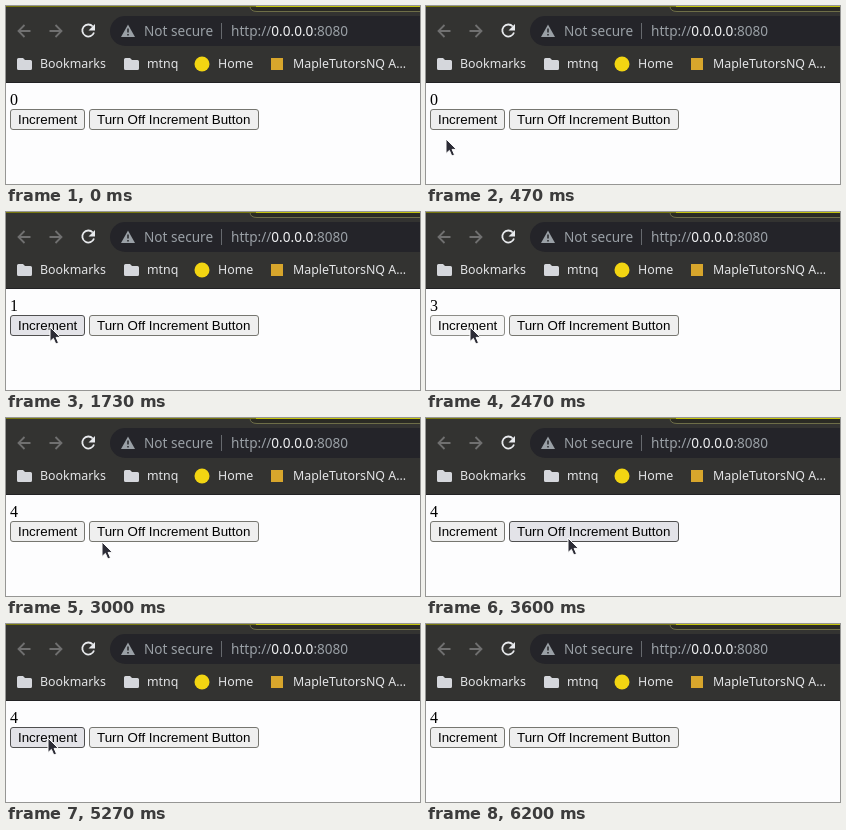
These frames come from a looping animation (414x178 px, 7470 ms). An HTML page:

```html
<!DOCTYPE html>
<html lang="en">
<head>
<meta charset="utf-8">
<title>Increment button</title>
<style>
  html, body { margin: 0; width: 100%; height: 100%; overflow: hidden; background: #fdfdfe; }
  svg { display: block; width: 414px; height: 178px; }
  text { white-space: pre; }
  .bookmarks { font: 12.4px "Noto Sans", sans-serif; fill: #e3e4e6; }
  .address { font: 13.6px "Noto Sans", sans-serif; fill: #9aa0a6; }
  .address .host { fill: #f1f2f4; }
  .icon { fill: none; stroke: #707070; stroke-width: 1.8; }
  .page { font: 16px "Liberation Serif", serif; fill: #000; }
  .button rect { fill: #efefef; stroke: #767670; }
  .button.hover rect { fill: #e3e3e8; stroke: #4f4f4f; }
  .button.pressed rect { fill: #f5f5f5; stroke: #8d8d88; }
  .button text { font: 13.333px "Liberation Sans", sans-serif; }
</style>
</head>
<body>
<svg viewBox="0 0 414 178">
  <defs>
    <path id="folder" d="M1.5 0H6l2 2h5.5Q15 2 15 3.500V10.500Q15 12 13.500 12H1.500Q0 12 0 10.500V1.500Q0 0 1.500 0Z" fill="#d5d7dc"/>
    <path id="arrow" d="M13 6.500H1.500M7 .5L1 6.500L7 12.500"/>
  </defs>

  <!-- Browser frame -->
  <rect width="414" height="77" fill="#333331"/>
  <path d="M244 0Q244 5.500 251 5.500H414V0Z" fill="#2b2b24"/>
  <path d="M244 0Q244 5.500 251 5.500H414" fill="none" stroke="#6e6e48"/>
  <rect width="250" height="1" fill="#77770f"/>
  <rect x="250" width="164" height="1" fill="#c4c40c"/>
  <rect y="76" width="414" height="1" fill="#222224"/>
  <rect x="104" y="10" width="340" height="30" rx="15" fill="#242429"/>

  <g class="icon">
    <use href="#arrow" x="11.500" y="18.500"/>
    <use href="#arrow" transform="translate(56.500 18.500) scale(-1 1)"/>
    <path d="M86.800 20.500A6 6 0 1 0 88 26.500" stroke="#e8eaed"/>
  </g>
  <path d="M89 18V24.500H82.500Z" fill="#e8eaed"/>
  <path d="M122 18.500L129 31H115Z" fill="#9aa0a6"/>
  <path d="M122 22.500V26.500M122 28V29.500" stroke="#242429" stroke-width="1.500"/>

  <g class="address">
    <text x="138" y="30">Not secure</text>
    <rect x="215" y="17" width="1" height="16" fill="#66696e"/>
    <text x="225" y="30">http://<tspan class="host">0.0.0.0</tspan>:8080</text>
  </g>

  <g class="bookmarks">
    <use href="#folder" x="11" y="52"/>
    <text x="34" y="62">Bookmarks</text>
    <use href="#folder" x="118" y="52"/>
    <text x="141" y="62">mtnq</text>
    <circle cx="196" cy="58" r="7.500" fill="#f2d512"/>
    <text x="212" y="62">Home</text>
    <rect x="265" y="52" width="12" height="12" fill="#d8a62c"/>
    <text x="287" y="62">MapleTutorsNQ A...</text>
  </g>

  <!-- Page -->
  <g class="page">
    <text id="count" x="4" y="99">0</text>
    <g class="button">
      <rect x="4.500" y="103.500" width="74" height="20" rx="2.500"/>
      <text x="12" y="118">Increment</text>
    </g>
    <g class="button">
      <rect x="83.500" y="103.500" width="169" height="20" rx="2.500"/>
      <text x="91" y="118">Turn Off Increment Button</text>
    </g>
  </g>

  <path id="cursor" d="M0 0V14.500L3.400 11.400L5.800 17L8.500 15.800L6.100 10.400H10.500Z"
        fill="#2c2c36" stroke="#fff" stroke-width="1"/>
</svg>

<script>
  const LOOP = 7470;
  const STEP = 200 / 3;
  const PRESS_LENGTH = 110;
  const MAX_COUNT = 4;

  // Cursor stops: time, x, y
  const stops = [
    [60, -8, 141], [350, 14, 138], [750, 45, 116], [1100, 45, 116],
    [1400, 44, 115], [2620, 44, 115], [2900, 86, 125], [3250, 138, 122],
    [3450, 142, 120], [3760, 142, 120], [3960, 102, 136], [4300, 42, 114],
    [5750, 42, 114], [6190, -12, 112]
  ];
  const presses = [1270, 1670, 2070, 2430, 3640, 4600, 4930, 5400];

  const buttons = [...document.querySelectorAll(".button")];
  const cursor = document.getElementById("cursor");
  const count = document.getElementById("count");

  function cursorAt(time) {
    const next = stops.findIndex(stop => stop[0] > time);
    if (next < 1) return null;
    const [t0, x0, y0] = stops[next - 1];
    const [t1, x1, y1] = stops[next];
    const p = (time - t0) / (t1 - t0);
    const eased = p * p * (3 - 2 * p);
    return { x: x0 + (x1 - x0) * eased, y: y0 + (y1 - y0) * eased };
  }

  function contains(button, point) {
    const { x, y, width, height } = button.querySelector("rect").getBBox();
    return point.x >= x && point.x <= x + width && point.y >= y && point.y <= y + height;
  }

  function draw(time) {
    const point = cursorAt(time);
    const pressed = presses.some(start => time >= start && time < start + PRESS_LENGTH);
    const clicks = presses.filter(start => time >= start + PRESS_LENGTH).length;

    count.textContent = Math.min(clicks, MAX_COUNT);
    cursor.style.display = point ? "" : "none";
    if (point) cursor.setAttribute("transform", `translate(${Math.round(point.x)} ${Math.round(point.y)})`);

    for (const button of buttons) {
      const hover = point !== null && contains(button, point);
      button.classList.toggle("hover", hover);
      button.classList.toggle("pressed", hover && pressed);
    }
  }

  function tick() {
    const time = performance.now() % LOOP;
    draw(Math.floor(time / STEP) * STEP);
    requestAnimationFrame(tick);
  }
  tick();
</script>
</body>
</html>
```
